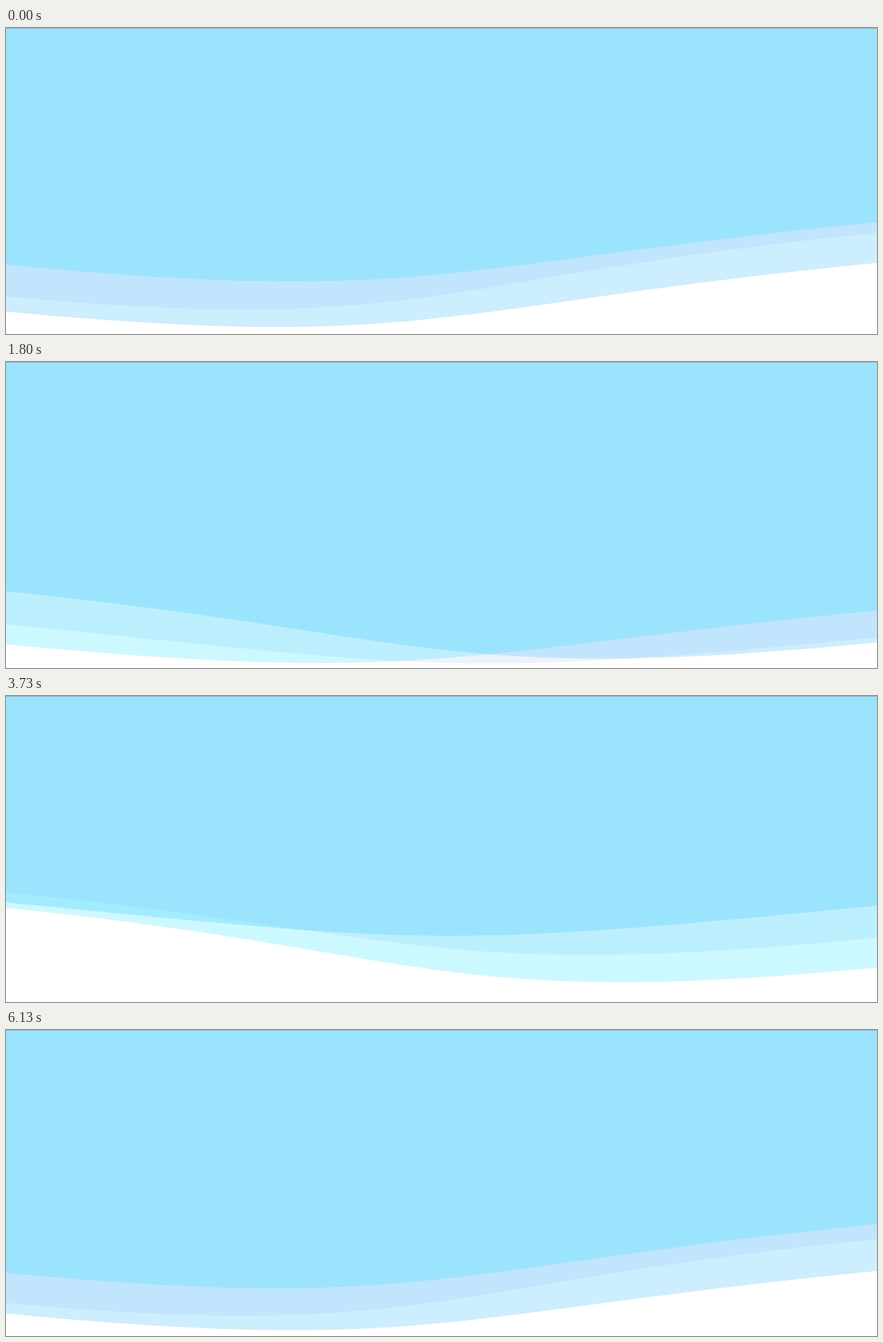
Recreate the animation shown at these times as an HTML page with a canvas. Size 1241x437 px, loop 6190 ms.

```html
<!DOCTYPE html>
<html lang="en">
<head>
<meta charset="utf-8">
<title>Waves</title>
<style>
html, body { margin: 0; height: 100%; overflow: hidden; background: #fff; }
canvas { display: block; }
</style>
</head>
<body>
<canvas id="stage" width="1241" height="437"></canvas>
<script>
const ctx = document.getElementById('stage').getContext('2d');
const LOOP = 6190;
const STEPS_PER_MS = 0.015;          // 15 poses per second, 4 degrees each
const LEFT = -32, WIDTH = 1276;      // the waves reach past both edges
const LEVEL = 339.5, SWING = 62.5;
const COLORS = [                     // bottom layer first
  'rgba(0, 168, 255, .2)',
  'rgba(157, 192, 249, .2)',
  'rgba(0, 222, 255, .2)'
];

function drawWave(color, degrees) {
  const angle = degrees * Math.PI / 180;
  const y0 = LEVEL + SWING * Math.sin(angle);
  const y1 = LEVEL + SWING * Math.cos(angle);
  const middle = LEFT + WIDTH / 2, right = LEFT + WIDTH;
  ctx.fillStyle = color;
  ctx.beginPath();
  ctx.moveTo(LEFT, y0);
  ctx.bezierCurveTo(middle, y0 + SWING, middle, y1 + SWING, right, y1);
  ctx.lineTo(right, 0);
  ctx.lineTo(LEFT, 0);
  ctx.fill();
}

function draw(time) {
  // Poses change on 10 ms ticks
  const tick = Math.floor((time % LOOP) / 10) * 10;
  const step = Math.floor((tick + 3.4) * STEPS_PER_MS);
  ctx.clearRect(0, 0, 1241, 437);
  COLORS.forEach((color, i) => drawWave(color, 94 + 45 * i - 4 * step));
  ctx.fillStyle = '#aaa4a6';
  ctx.fillRect(0, 0, 1241, 1);
}

let start;
function frame(now) {
  start ??= now;
  draw(now - start);
  requestAnimationFrame(frame);
}
draw(0);
requestAnimationFrame(frame);
</script>
</body>
</html>
```
